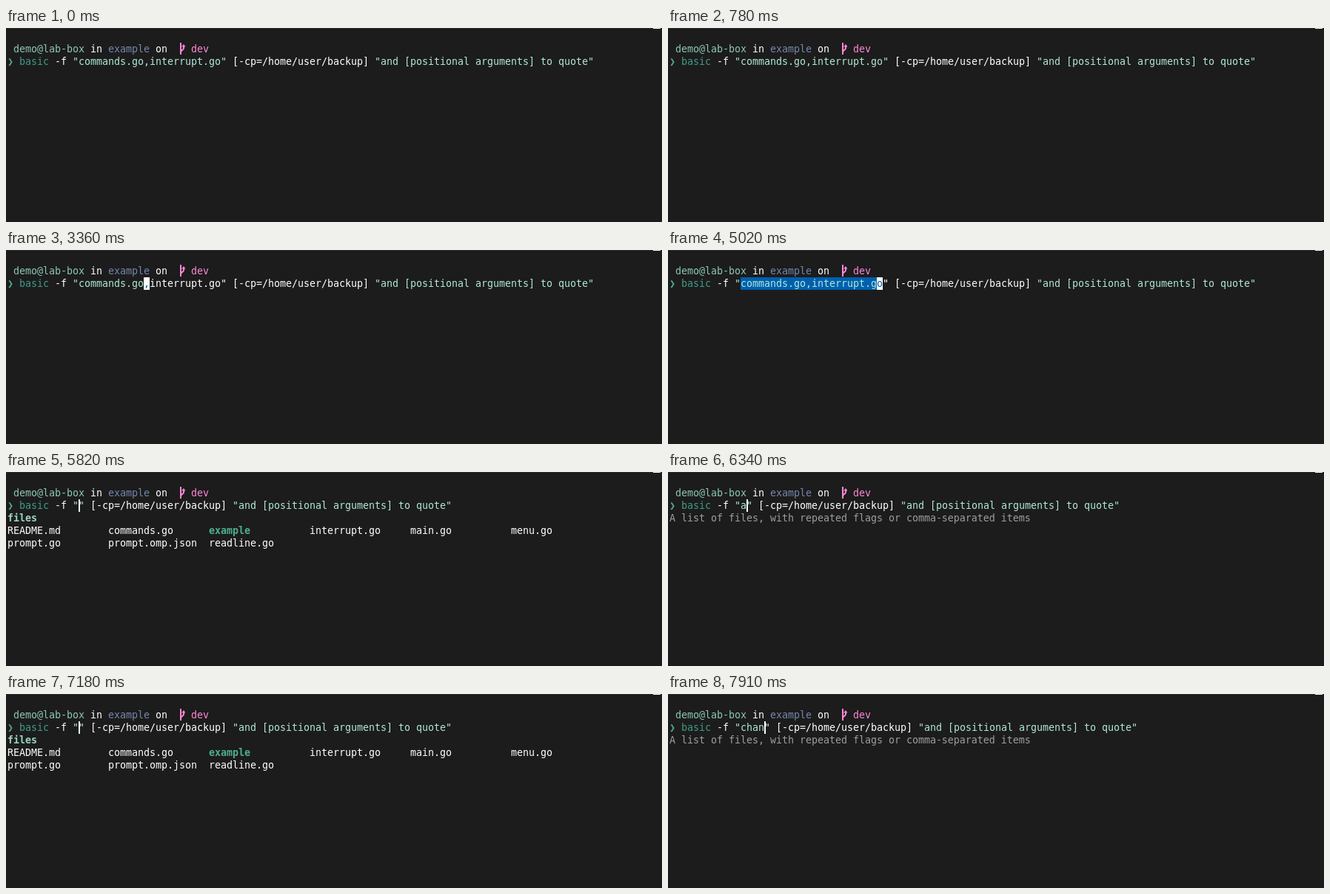
Write an HTML page that moves like this. It is 886 px wide and 263 px high and loops after 8000 ms.

```html
<!DOCTYPE html>
<html>
<head>
<meta charset="utf-8">
<style>
  html, body { margin: 0; width: 100%; height: 100%; overflow: hidden; background: #1c1c1c; }
  #stage { position: relative; width: 886px; height: 263px; overflow: hidden; background: #1c1c1c;
    font: 13.333px/17px "DejaVu Sans Mono", monospace; letter-spacing: -.027px; }
  #stage span { position: absolute; height: 17px; white-space: pre; }
  #edge { position: absolute; left: 0; top: 0; width: 874px; height: 1px; background: #2b2b2b;
    border-right: 10px solid #fff; }
  svg { position: absolute; left: 234px; top: 20px; }
</style>
</head>
<body>
<div id="stage">
  <div id="edge"></div>
  <svg width="9" height="17" fill="none" stroke="#ff87d7" stroke-width="2">
    <path d="M2 0V16M2.5 12C3 9 6 10 6 7V4"/>
    <path d="M3 5.5L6 2L8.5 5.5Z" fill="#ff87d7" stroke="none"/>
  </svg>
  <div id="prompt"></div>
  <div id="screen"></div>
</div>
<script>
const BG = '#1c1c1c', WHITE = '#fff', MINT = '#afe8d5', TEAL = '#3d9c86',
      GREEN = '#4fae92', BLUE = '#005faf', GREY = '#9e9e9e';
const LOOP = 8000, INSERT = 5820, ARG = 12;
const FILES = 'commands.go,interrupt.go';
const MENU = ['README.md', 'commands.go', 'example', 'interrupt.go', 'main.go', 'menu.go',
              'prompt.go', 'prompt.omp.json', 'readline.go'];

// [start ms, cursor column or -1 when hidden, selected columns]
const normal = [
  [0, -1], [60, 42], [190, 40], [390, -1], [520, 38],
  [720, 36], [780, -1], [840, 34], [1040, 33], [1240, 24], [1370, 23], [1700, -1],
  [2360, 23, [23, 24]], [2560, -1, [23, 24]], [3360, 23, [23, 24]],
  [3760, 35, [12, 36]], [4220, -1, [12, 36]], [5020, 35, [12, 36]]
];
// [start ms, typed argument, cursor hidden]
const insert = [
  [INSERT, ''], [6340, 'a'], [6400, 'ac'], [6660, 'ac', true], [6920, 'a'],
  [7120, ''], [7250, 'c'], [7310, 'ch'], [7510, 'cha'], [7910, 'chan']
];

let layer;
function put(col, row, text, color, bg, bold) {
  const el = document.createElement('span');
  el.textContent = text;
  el.style.cssText = `left:${2 + col * 8}px;top:${3 + row * 17}px;color:${color};`;
  if (bg) el.style.cssText += `background:${bg};width:${text.length * 8}px`;
  if (bold) el.style.fontWeight = 'bold';
  layer.append(el);
}

function commandLine(arg) {
  const runs = [
    ['❯', GREEN], ['basic', TEAL], ['-f', WHITE], [`"${arg}"`, MINT],
    ['[-cp=/home/user/backup]', WHITE], ['"and [positional arguments] to quote"', MINT]
  ];
  let col = 0;
  for (const [text, color] of runs) {
    put(col, 2, text, color);
    col += text.length + 1;
  }
}

function drawNormal([start, cursor, sel]) {
  const line = `❯ basic -f "${FILES}" [-cp=/home/user/backup]`;
  commandLine(FILES);
  if (sel) {
    // text behind the selection loses its highlighting
    put(24, 2, line.slice(24, 37), WHITE, BG);
    put(sel[0], 2, line.slice(...sel), MINT, BLUE);
  }
  if (cursor >= 0) put(cursor, 2, line[cursor], sel ? BLUE : BG, WHITE);
}

function drawInsert([start, arg, hidden]) {
  commandLine(arg);
  if (arg) {
    put(0, 3, 'A list of files, with repeated flags or comma-separated items', GREY);
  } else {
    put(0, 3, 'files', '#9bd5c2', null, true);
    MENU.forEach((name, i) => {
      const dir = name === 'example';
      put(i % 6 * 17, 4 + Math.floor(i / 6), name, dir ? GREEN : WHITE, null, dir);
    });
  }
  if (!hidden) {
    put(ARG + arg.length, 2, '', WHITE, WHITE);
    layer.lastChild.style.width = '2px';
  }
}

layer = document.getElementById('prompt');
put(1, 1, 'demo@lab-box', '#8cc7b4');
put(14, 1, 'in', WHITE);
put(17, 1, 'example', '#7587ab');
put(25, 1, 'on', WHITE);
put(31, 1, 'dev', '#ff87d7');

layer = document.getElementById('screen');
let shown;
const begin = performance.now();
function tick() {
  const t = Math.max(0, performance.now() - begin) % LOOP;
  const steps = t < INSERT ? normal : insert;
  const step = steps.filter(s => s[0] <= t).pop();
  if (step !== shown) {
    shown = step;
    layer.textContent = '';
    (steps === normal ? drawNormal : drawInsert)(step);
  }
  requestAnimationFrame(tick);
}
tick();
</script>
</body>
</html>
```
